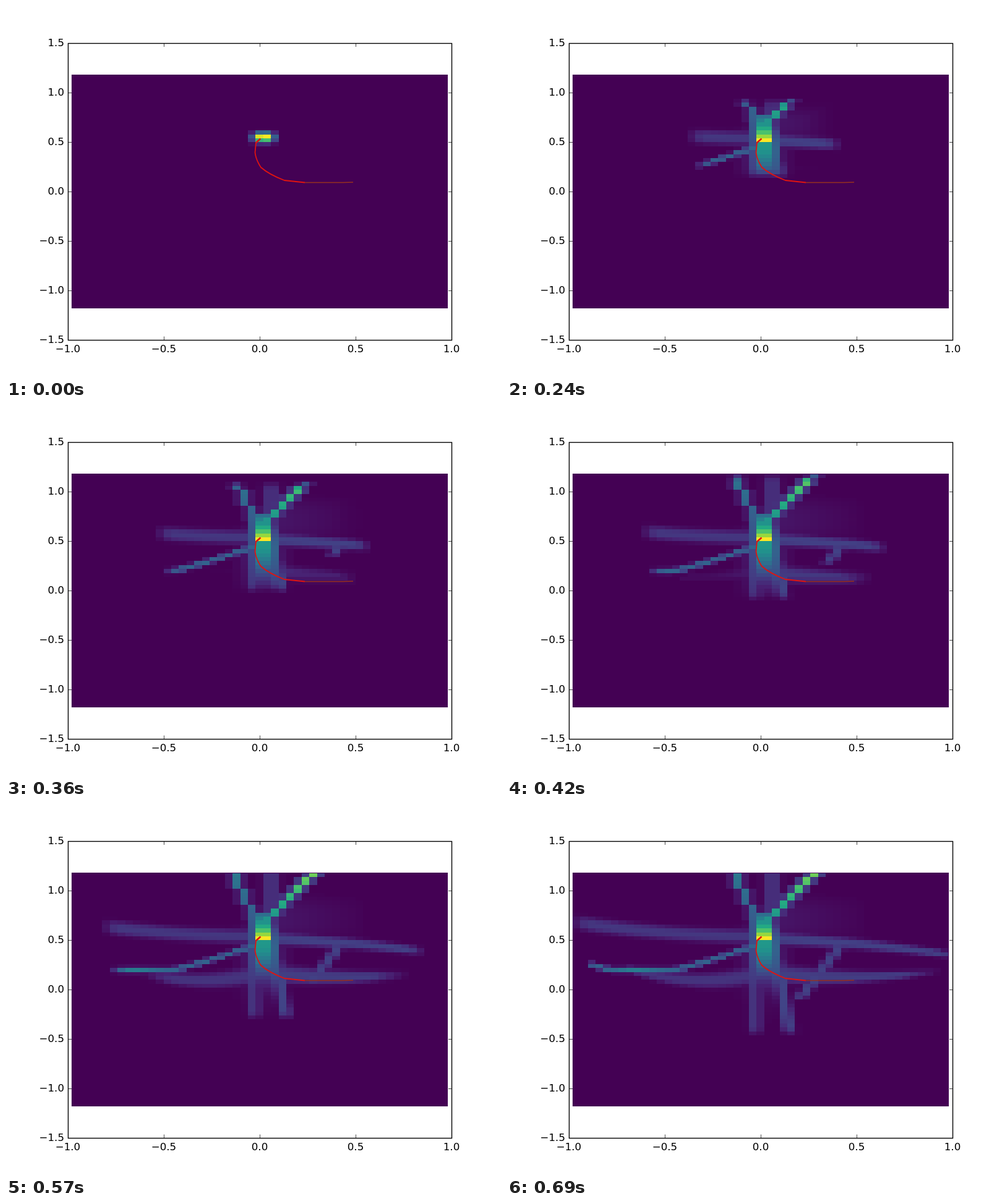
Animation, 800 px wide and 600 px high, one loop 0.72 s. Source, as an HTML page with a canvas:

```html
<!DOCTYPE html>
<html lang="en">
<head>
<meta charset="utf-8">
<title>Spreading heat map</title>
<style>
html, body { margin: 0; width: 800px; height: 600px; overflow: hidden; background: #fff; }
canvas, svg { position: absolute; left: 0; top: 0; }
text { font: 16.67px "DejaVu Sans", sans-serif; fill: #000; }
</style>
</head>
<body>
<canvas id="heat" width="800" height="600"></canvas>
<svg width="800" height="600" viewBox="0 0 800 600">
  <g fill="none" stroke-linejoin="round">
    <path d="M483 285.5H545L561 285" stroke="#96301f" stroke-width="1.6"/>
    <path d="M411 215L404 221L402.5 237Q404 249 412 261Q426 273 450 282L483 285.5" stroke="#e01410" stroke-width="1.8"/>
    <path d="M411.5 214.5L404 221" stroke="#e01410" stroke-width="2.4"/>
  </g>
  <g id="axes" stroke="#000" fill="none"></g>
  <g id="labels"></g>
</svg>
<script>
const COLS = 49, ROWS = 59, CELL = .04, STEP = 30, STEPS = 24;
const ctx = document.getElementById('heat').getContext('2d');
const clamp = v => Math.max(0, Math.min(1, v));
const mix = (a, b, k) => a + (b - a) * k;
const bell = (d, width, power = 2) => Math.exp(-Math.pow(Math.abs(d) / width, power));

// Viridis
const stops = ['440154', '482475', '414487', '355f8d', '2a788e', '21918c',
  '22a884', '44bf70', '7ad151', 'bddf26', 'fde725']
  .map(h => [0, 2, 4].map(i => parseInt(h.slice(i, i + 2), 16)));

function shade(v) {
  const p = clamp(v) * 10, i = Math.min(9, Math.floor(p));
  return 'rgb(' + stops[i].map((a, k) => Math.round(mix(a, stops[i + 1][k], p - i))) + ')';
}

// A stream runs along one axis, in plot units: its centre line, width and
// strength depend on the position; delay and ramp (in steps) shape its front.
const across = (from, to, mid, width, amp, delay = 0, ramp = 2) =>
  ({ from, to, mid, width, amp, delay, ramp });
const upright = (...args) => ({ ...across(...args), upright: true });

const streams = [
  // upper arms, left and right
  across(-1, -.05, x => .54 + .15 * x * x, () => .065, () => .16),
  across(.1, 1, x => .52 - .06 * x - .11 * x * x, x => .065 - .03 * x, () => .19),
  // thin arm, lower left
  across(-.9, -.03, x => .2 + .27 * Math.pow(Math.max(0, 1 + x / .46), 1.2) + .5 * Math.max(0, -x - .78),
    () => .03, x => .32 + .1 * bell(x + .65, .1), 1),
  // lower lenses
  across(.1, .92, x => .13 + .25 * (x - .45) ** 2, x => .095 - .075 * x, () => .18, 2, 5),
  across(-.68, -.08, x => .095 + .8 * (x + .3) ** 2, x => .09 + .07 * x, () => .15, 5, 4),
  // stepped upper branches and the streak between them
  upright(.69, 1.2, y => -.04 - .04 * Math.floor((y - .7) / .165), () => .033, y => .28 + .25 * (y - .7)),
  upright(.65, 1.2, y => .08 + .04 * Math.floor((y - .73) / .08), () => .035, y => .5 + .6 * (y - .7)),
  upright(.65, 1.2, () => .06, () => .045, () => .14),
  // core, above and below the hot spot
  upright(.5, .76, () => .02, () => .04, y => 1.13 * Math.exp(4.2 * (.52 - y))),
  upright(-.1, .5, () => .02, () => .04, y => .6 * bell(y - .48, .33)),
  // legs
  upright(-.5, .73, () => -.03, () => .035, y => .15 + .2 * Math.max(0, y)),
  upright(-.5, .7, y => .11 - .1 * y, () => .035, y => .2 + .3 * Math.max(0, y)),
  // haze
  across(.1, .6, () => .72, () => .2, x => .07 * (1 - x / .6), 1, 4),
  upright(-.4, .65, () => .02, () => .12, y => .09 * bell(y - .35, .4)),
  // side branch turning back to the centre, at its own pace
  { ...upright(-.3, .45, y => .24 + .4 * y, () => .034, () => .19),
    born: y => 12 + (.34 - y) * 24 }
];

function strength(s, x, y) {
  const p = s.upright ? y : x, q = s.upright ? x : y;
  return p < s.from || p > s.to ? 0 : s.amp(p) * bell(q - s.mid(p), s.width(p), 3);
}

const edgeX = c => Math.floor(106.2 + 12.4 * c);
const edgeY = r => Math.round(111.5 + 6.4 * r);

const cells = [];
for (let r = 0; r < ROWS; r++) for (let c = 0; c < COLS; c++) {
  const x = (c - 24) * CELL, y = (29 - r) * CELL;
  // The front moves one cell per step in each direction.
  const reach = Math.max(0, 23 - c, c - 26, 14 - r, r - 17);
  const parts = streams.map(s => ({
    amp: strength(s, x, y),
    born: Math.max(reach, s.born ? s.born(y) : reach && reach + s.delay),
    ramp: s.ramp
  })).filter(p => p.amp > .005);
  const spot = reach ? 0 : 1.2 * bell(x - .022, .05) * bell(y - .55, .047);
  if (parts.length) cells.push({ c, r, parts, spot });
}

function heat({ parts, spot }, n) {
  const now = parts.map(p => n < p.born ? 0 : p.amp * clamp((n - p.born + .7) / p.ramp));
  return mix(spot, Math.max(...now), clamp(n / 3));
}

let shown = -1;
function draw(time) {
  const n = Math.floor(time / STEP) % STEPS;
  if (n === shown) return;
  shown = n;
  ctx.fillStyle = shade(0);
  ctx.fillRect(106, 111, 608, 378);
  for (const cell of cells) {
    const { c, r } = cell, left = edgeX(c), top = edgeY(r);
    ctx.fillStyle = shade(heat(cell, n));
    ctx.fillRect(left, top, edgeX(c + 1) - left, edgeY(r + 1) - top);
  }
}

function buildAxes() {
  let ticks = '', labels = '';
  const name = v => (v < 0 ? '\u2212' : '') + Math.abs(v).toFixed(1);
  for (let v = -1; v <= 1; v += .5) {
    const x = 410 + v * 310;
    ticks += `M${x + .5} 540v-5.5M${x + .5} 60.5v5.5`;
    labels += `<text x="${x}" y="560" text-anchor="middle">${name(v)}</text>`;
  }
  for (let v = -1.5; v <= 1.5; v += .5) {
    const y = 300 - v * 160;
    ticks += `M100.5 ${y + .5}h5.5M720.5 ${y + .5}h-5.5`;
    labels += `<text x="94" y="${y + 5}" text-anchor="end">${name(v)}</text>`;
  }
  document.getElementById('axes').innerHTML =
    `<path d="${ticks}" stroke-width=".7"/><rect x="100.5" y="60.5" width="620" height="480" stroke-width="1.39"/>`;
  document.getElementById('labels').innerHTML = labels;
}

buildAxes();
const start = performance.now();
function loop() {
  draw(performance.now() - start);
  requestAnimationFrame(loop);
}
loop();
</script>
</body>
</html>
```
